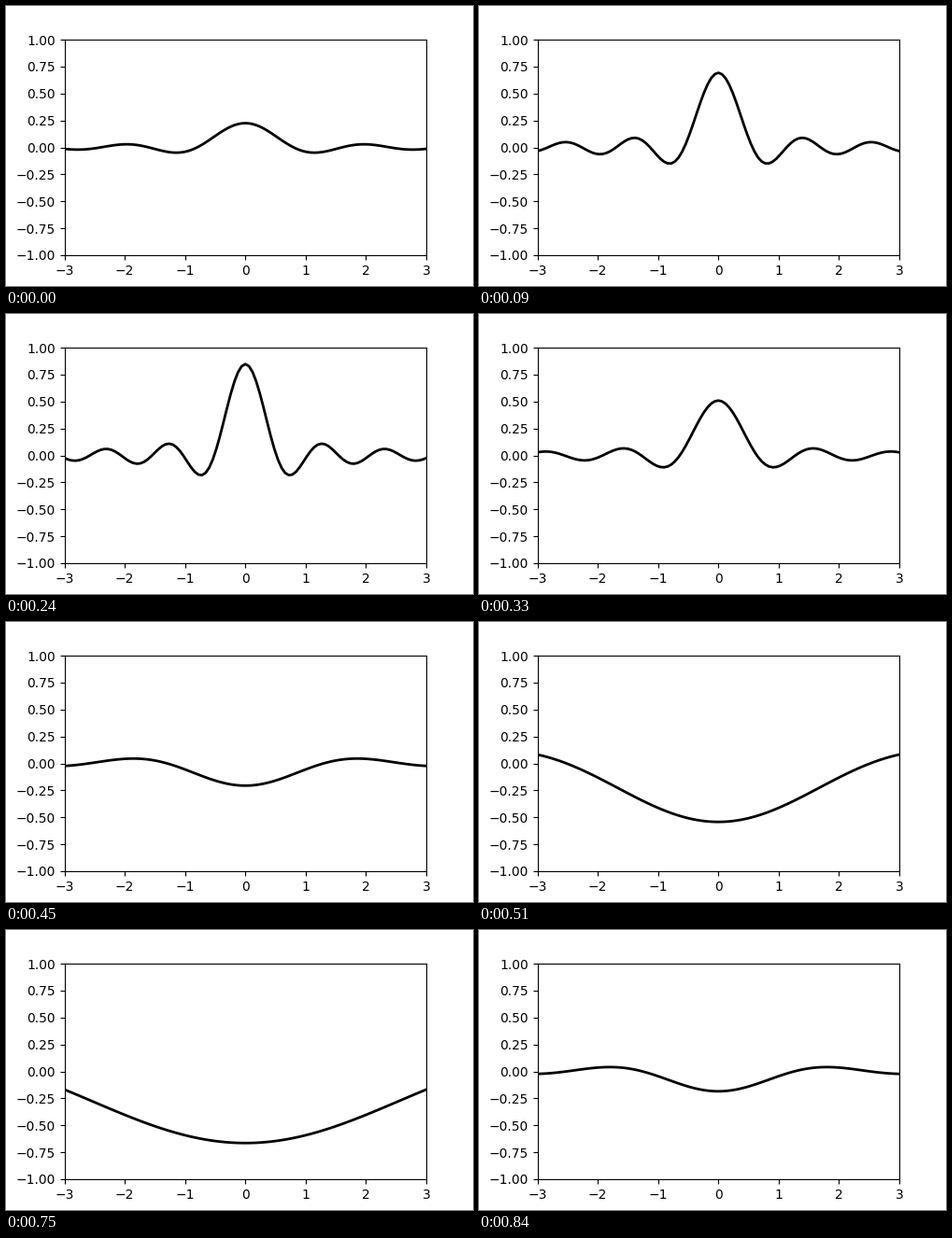
These frames come from a looping animation (500 by 300 pixels, 870 ms). A matplotlib script:

```python
import numpy as np
import matplotlib.pyplot as plt
from matplotlib.animation import FuncAnimation

FRAMES = 29
STEP_MS = 30
PHASE, RATE = 0.2527, 0.208

fig, ax = plt.subplots(figsize=(5, 3), dpi=100)
ax.set_xlim(-3, 3)
ax.set_ylim(-1, 1)
ax.set_xticks(np.arange(-3, 4))
ax.set_yticks(np.linspace(-1, 1, 9))

x = np.linspace(-3, 3, 101)
line, = ax.plot([], [], color="black", lw=2)


def wave(i):
    """Sinc pulse whose height and frequency swing together."""
    swing = np.sin(PHASE + RATE * i)
    return 0.9 * swing * np.sinc((1 + swing) * x)


def update(i):
    line.set_data(x, wave(i))
    return line,


anim = FuncAnimation(fig, update, frames=FRAMES, interval=STEP_MS,
                     init_func=lambda: update(0), repeat=True, repeat_delay=0)
plt.show()
```
